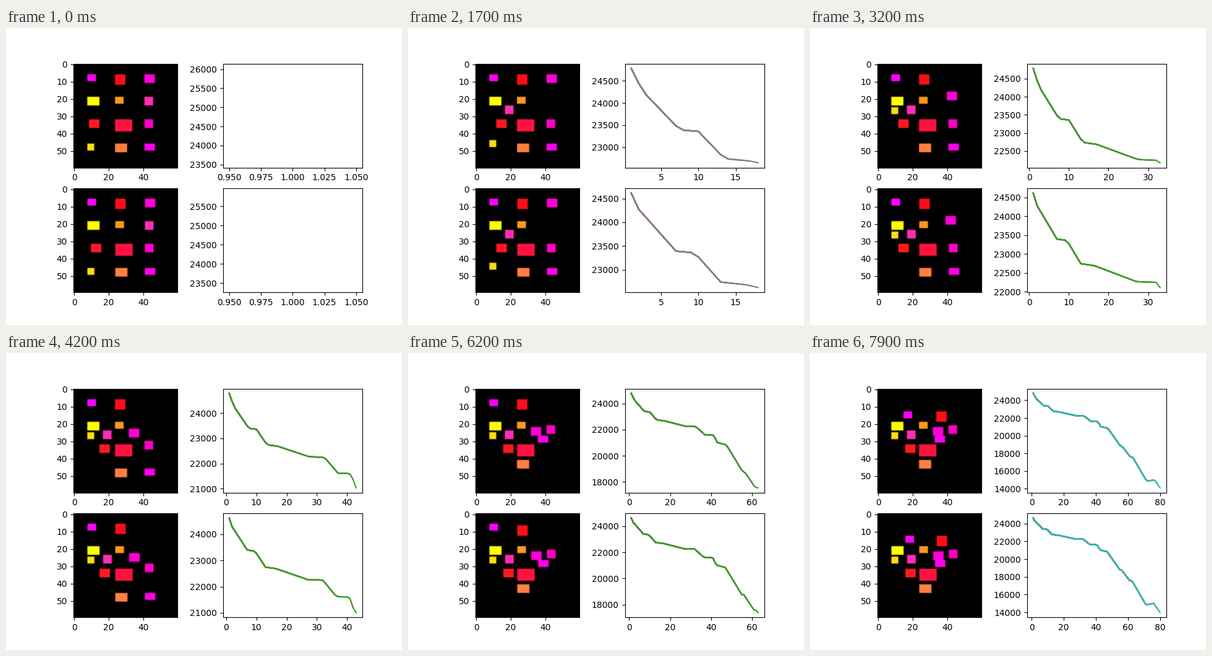
Recreate the animation shown at these times as a matplotlib script. Size 640 by 480 pixels, loop 8 s.

```python
import numpy as np
import matplotlib.pyplot as plt
from matplotlib.animation import FuncAnimation

FRAMES = 80
SIZE = 60
X, Y = 0, 1
START_COST = 24783

# blocks start on a grid of four rows and three columns
CORNERS = [(x, y) for y in (6, 19, 32, 46) for x in (8, 24, 41)]
# width, height, green, blue; red is always full
STYLES = [
    (5, 4, 0, 255), (6, 6, 14, 23), (6, 5, 0, 214),
    (7, 5, 255, 0), (5, 4, 152, 27), (5, 5, 45, 181),
    (6, 5, 24, 35), (10, 7, 18, 64), (5, 5, 0, 196),
    (4, 4, 221, 14), (7, 5, 128, 64), (6, 4, 0, 235),
]

# block, axis, signed number of unit steps, cost change per step
MOVES = [
    (6, X, 3, -170), (5, X, -10, -88), (5, Y, 5, -7), (5, X, -7, -88),
    (5, X, -7, -8), (9, Y, -21, -20), (2, Y, 10, -2), (2, X, -9, -70),
    (2, Y, 7, -1), (8, Y, -2, -34), (6, X, 3, -170), (8, Y, -9, -22),
    (2, Y, -1, -120), (11, Y, -15, -129), (11, X, -2, -6), (11, Y, -4, -117),
    (6, X, 1, -117), (10, Y, -5, -117), (11, X, -3, -16), (1, Y, 7, -155),
    (1, X, 10, -155), (11, X, -3, -10), (0, Y, 7, 18), (0, X, 8, -130),
]


def walk():
    """Corners and cost after every unit step."""
    pos = np.array(CORNERS)
    pos[6, X] += 1
    states, costs = [pos.copy()], [START_COST]
    for block, axis, count, change in MOVES:
        for _ in range(abs(count)):
            pos[block, axis] += np.sign(count)
            states.append(pos.copy())
            costs.append(costs[-1] + change)
    return states, np.array(costs)


def grid(pos):
    img = np.zeros((SIZE, SIZE, 3), np.uint8)
    for (x, y), (w, h, green, blue) in zip(pos, STYLES):
        img[y:y + h, x:x + w] = 255, green, blue
    return img


states, costs = walk()
fig, axes = plt.subplots(2, 2, figsize=(6.4, 4.8), dpi=100)
images = [ax.imshow(grid(states[row])) for row, ax in enumerate(axes[:, 0])]

# the top row shows even steps, the bottom row odd ones;
# every frame lays one more line over the earlier ones
xs = np.arange(1, FRAMES + 1)
curves = [[ax.plot(xs[:n], costs[row::2][:n])[0] for n in xs]
          for row, ax in enumerate(axes[:, 1])]


def update(k):
    for row, ax in enumerate(axes[:, 1]):
        images[row].set_data(grid(states[2 * k + row]))
        for i, line in enumerate(curves[row]):
            line.set_visible(i <= k)
        ax.relim(visible_only=True)
        ax.autoscale_view()
    return []


anim = FuncAnimation(fig, update, frames=FRAMES, interval=100,
                     repeat=True, repeat_delay=0, blit=False)
plt.show()
```
